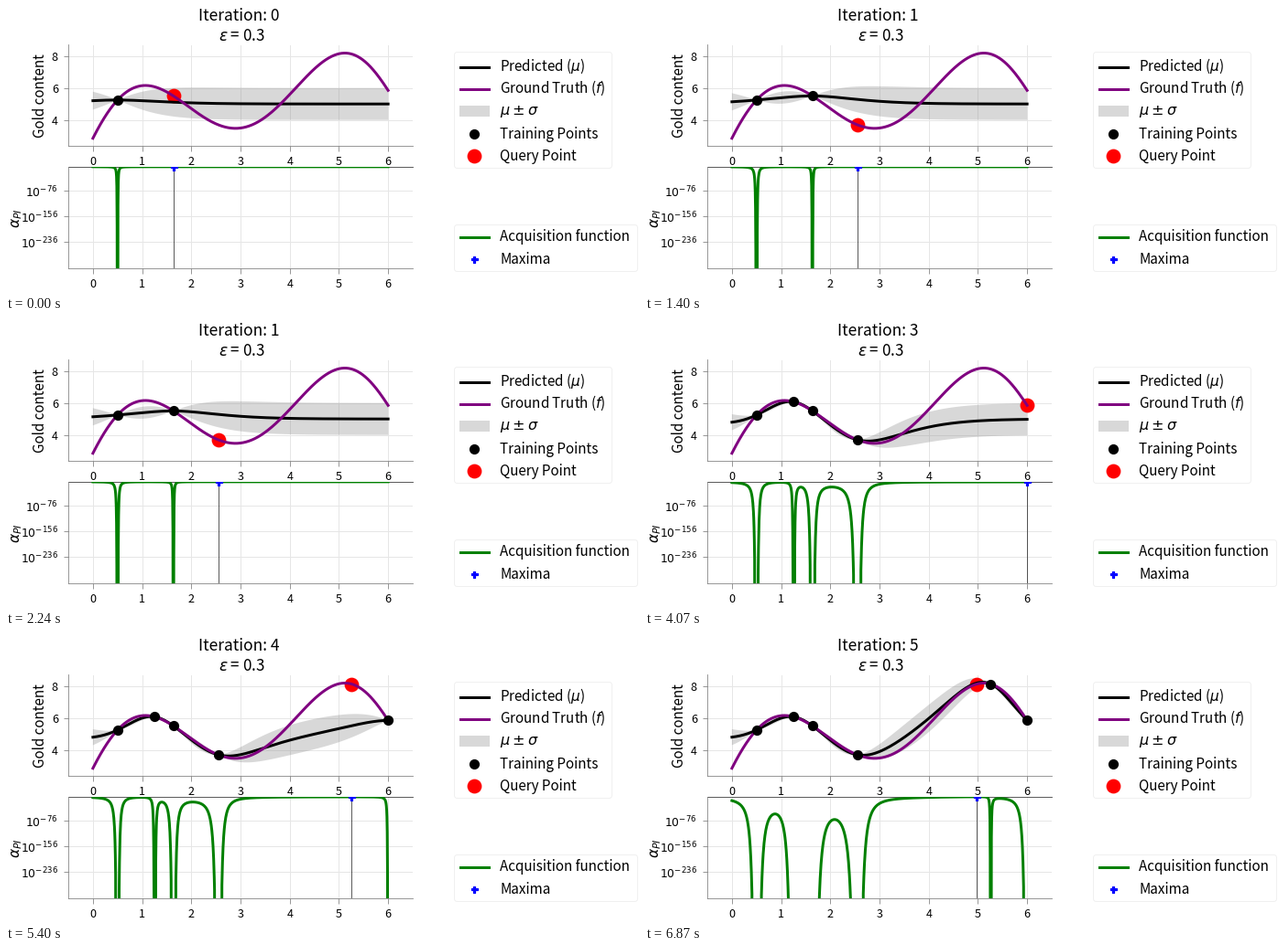
Animation, 691 px wide and 314 px high, one loop 8000 ms. Source, as a matplotlib script:

```python
import math

import matplotlib.pyplot as plt
import numpy as np
from matplotlib.animation import FuncAnimation
from matplotlib.patches import FancyBboxPatch, Rectangle

W, H, DPI = 691, 314, 64
PX = 72 / DPI                     # points per pixel
LOOP, STEP = 8000, 40             # milliseconds
STARTS = [0, 1400, 2800, 4070, 5400, 6870]
QUERIES = [0.5, 1.636, 2.548, 1.257, 6.0, 5.26, 4.975]
PRIOR, EPS = 5.0, 0.3

plt.rcParams.update({
    "font.family": "Noto Sans CJK JP",
    "mathtext.fontset": "dejavusans",
    "axes.unicode_minus": False,
})

# --- model -----------------------------------------------------------------
KNOTS = np.array([
    (0, 2.857), (0.5, 5.245), (1.08, 6.16), (1.25, 6.08), (1.64, 5.49),
    (2.55, 3.69), (2.88, 3.49), (3.82, 5.01), (4.5, 7.21), (4.97, 8.10),
    (5.13, 8.18), (5.26, 8.13), (6, 5.85)])
truth = np.polynomial.Polynomial.fit(KNOTS[:, 0], KNOTS[:, 1], 7)
xs = np.linspace(0, 6, 1001)
erfc = np.vectorize(math.erfc)


def matern(a, b):
    s = math.sqrt(5) * np.abs(a[:, None] - b[None, :])
    return (1 + s + s * s / 3) * np.exp(-s)


def posterior(px):
    k = matern(px, xs)
    gain = np.linalg.solve(matern(px, px) + 1e-10 * np.eye(len(px)), k)
    mean = PRIOR + gain.T @ (truth(px) - PRIOR)
    var = 1 - np.sum(k * gain, axis=0)
    return mean, np.sqrt(np.maximum(var, 1e-12))


def log_improvement(mean, sd, best):
    p = erfc((best + EPS - mean) / sd / math.sqrt(2)) / 2
    with np.errstate(divide="ignore"):
        return np.maximum(np.log10(p), -999)


def solve(step):
    px = np.array(QUERIES[:step + 1])
    mean, sd = posterior(px)
    return px, mean, sd, log_improvement(mean, sd, truth(px).max())


STATES = [solve(i) for i in range(len(STARTS))]

# --- stage -----------------------------------------------------------------
fig = plt.figure(figsize=(W / DPI, H / DPI), dpi=DPI, facecolor="white")
page = fig.add_axes([0, 0, 1, 1])
page.set(xlim=(0, W), ylim=(H, 0))
page.axis("off")


def label(x, y, text, size=15.2, **kw):
    return page.text(x, y, text, fontsize=size * PX, **kw)


def panel(top, bottom, ylim, ticks, names):
    ax = fig.add_axes([68 / W, 1 - bottom / H, 376 / W, (bottom - top) / H])
    ax.patch.set_visible(False)
    ax.set(xlim=(-0.5, 6.5), ylim=ylim, xticks=range(7))
    ax.set_yticks(ticks, names)
    ax.set_axisbelow(True)
    ax.grid(color="#e6e6e6", lw=PX)
    ax.tick_params(color="gray", length=5.5 * PX, pad=5.5 * PX,
                   width=0.8 * PX, labelsize=12.6 * PX)
    for side, spine in ax.spines.items():
        spine.set_visible(side in ("left", "bottom"))
        spine.set(color="gray", linewidth=0.8 * PX)
    return ax


def px_value(y):
    return (194.7 - y) / 17.5


top = panel(42.5, 153, (px_value(153), px_value(42.5)), [4, 6, 8], "468")
low = panel(176, 286.5, (-316, -1), [-236, -156, -76],
            [f"$10^{{{e}}}$" for e in (-236, -156, -76)])
low.tick_params(axis="y", labelsize=12.4 * PX)

LINE = dict(lw=3 * PX)
THIN = dict(color="black", lw=0.8 * PX, alpha=0.8)
DOT = dict(marker="o", ls="none", color="black", ms=11.2 * PX, mew=0)
RED = dict(marker="o", ls="none", color="red", ms=15.8 * PX, mew=0)
PLUS = dict(marker="P", ls="none", color="blue", ms=7 * PX, mew=1.2 * PX)
BAND = dict(facecolor="gray", alpha=0.3, lw=0)

band = top.fill_between(xs, xs, xs, zorder=1, **BAND)
query, = top.plot([], [], zorder=2, **RED)
mean_line, = top.plot([], [], color="black", zorder=3, **LINE)
top.plot(xs, truth(xs), color="purple", zorder=4, **LINE)
dots, = top.plot([], [], zorder=5, **DOT)

low.axhline(-1, clip_on=False, zorder=2, **THIN)
marker_line = low.axvline(0, zorder=2, **THIN)
acq_line, = low.plot([], [], color="green", zorder=3, **LINE)
maxima, = low.plot([], [], zorder=4, **PLUS)

# --- labels and legends ----------------------------------------------------
title = label(254, 16.5, "", 17.3, ha="center")
label(257, 37.5, r"$\varepsilon$ = 0.3", 17, ha="center")
label(42.5, 98.5, "Gold content", rotation=90, rotation_mode="anchor",
      ha="center")
label(11, 232, r"$\alpha_{PI}$", 15.5, rotation=90, ha="center", va="center")


def legend_box(x0, y0, x1, y1):
    page.add_patch(FancyBboxPatch(
        (x0, y0), x1 - x0, y1 - y0, boxstyle="round,pad=0,rounding_size=3",
        facecolor="white", edgecolor="#f0f0f0", lw=PX))


def legend_line(y, color, text):
    page.plot([496, 527.5], [y, y], color=color, **LINE)
    label(539.5, y + 4.5, text)


def legend_mark(y, style, text):
    page.plot([511.5], [y], **style)
    label(539.5, y + 5, text)


legend_box(489.5, 50.5, 661.5, 177.5)
legend_line(66.5, "black", r"Predicted ($\mu$)")
legend_line(90.5, "purple", "Ground Truth ($f$)")
page.add_patch(Rectangle((495, 109), 33, 11.5, **BAND))
label(539.5, 119.5, r"$\mu \pm \sigma$", 16)
legend_mark(140, DOT, "Training Points")
legend_mark(164, RED, "Query Point")
legend_box(489.5, 239.5, 689.5, 290.5)
legend_line(252.5, "green", "Acquisition function")
legend_mark(277, PLUS, "Maxima")


# --- motion ----------------------------------------------------------------
def update(i):
    now = (i + 1) * STEP - 1
    step = sum(now >= s for s in STARTS) - 1
    px, mean, sd, acq = STATES[step]
    nxt = QUERIES[step + 1]

    title.set_text(f"Iteration: {step}")
    mean_line.set_data(xs, mean)
    edge = np.r_[mean + sd, (mean - sd)[::-1]]
    band.set_verts([np.column_stack((np.r_[xs, xs[::-1]], edge))])
    dots.set_data(px, truth(px))
    query.set_data([nxt], [truth(nxt)])
    acq_line.set_data(xs, acq)
    marker_line.set_xdata([nxt, nxt])
    maxima.set_data([nxt], [np.interp(nxt, xs, acq)])


anim = FuncAnimation(fig, update, frames=LOOP // STEP, interval=STEP,
                     init_func=lambda: update(0), repeat=True, repeat_delay=0)
plt.show()
```
